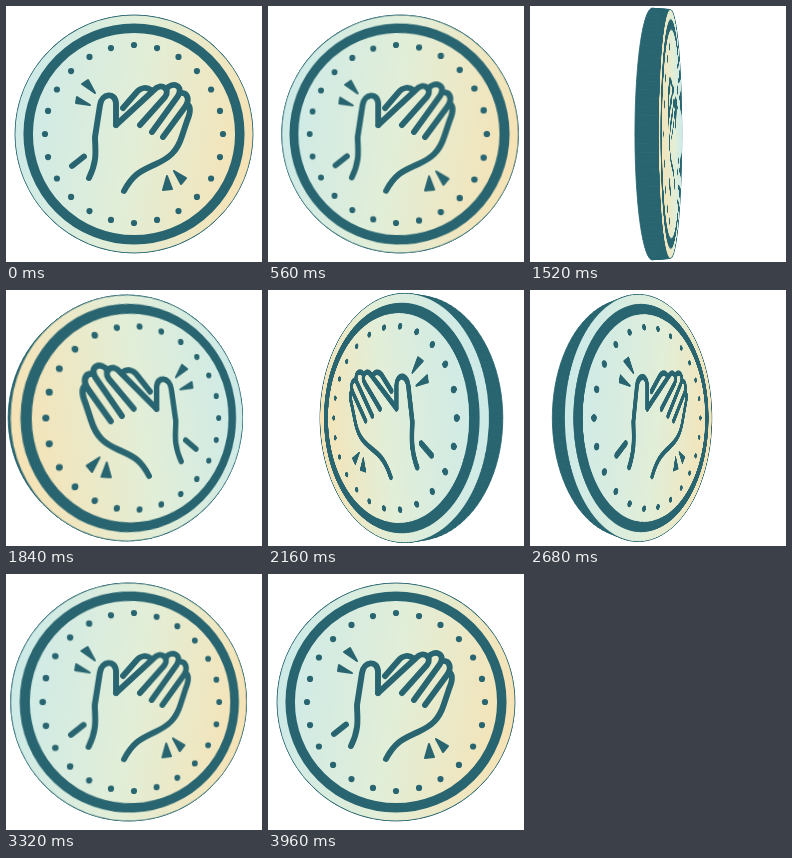
Animation of 256x256 px, one loop 4 s. Source, as an HTML page with a canvas:

```html
<!DOCTYPE html>
<html lang="en">
<head>
<meta charset="utf-8">
<title>Spinning coin</title>
<style>
  html, body { margin: 0; width: 100%; height: 100%; overflow: hidden; background: #fff; }
  #stage { position: relative; width: 100%; height: 100%; overflow: clip; contain: strict; }
  canvas, svg { position: absolute; left: 0; top: 0; width: 256px; height: 256px; }
</style>
</head>
<body>
<div id="stage">
<canvas id="side" width="256" height="256"></canvas>
<svg id="face" viewBox="0 0 256 256">
  <defs>
    <linearGradient id="sheen" x1="0" y1=".42" x2="1" y2=".58">
      <stop offset="0" stop-color="#cdeae8"/>
      <stop offset=".5" stop-color="#e2eed7"/>
      <stop offset="1" stop-color="#f6e2b4"/>
    </linearGradient>
  </defs>
  <circle cx="128" cy="128" r="118.6" fill="url(#sheen)"/>
  <g fill="none" stroke="#286570" stroke-width="5.9" stroke-linecap="round" stroke-linejoin="round">
    <circle cx="128" cy="128" r="105.8" stroke-width="9.5"/>
    <path d="M66 160L78 150.500"/>
    <path d="M83 172C92 154 89 143 89 131L94 99C96 87 109 86 110 97L110 119"/>
    <path d="M117 102L130 87C135 81 141 81 145 84"/>
    <path d="M110 119L148 84C155 76 165 83 159 91L134 119"/>
    <path d="M160 83C167 75 178 80 172 90L146 126"/>
    <path d="M174 87C182 86 184 94 179 101L157 131"/>
    <path d="M181 98C186 101 184 108 181 115L176 130C171 146 163 152 150 158C138 164 128 166 118 185"/>
  </g>
  <g fill="#286570" stroke="#286570" stroke-width="2" stroke-linejoin="round">
    <path d="M76 78L82 74L89 87ZM71 91L70 97L84 99Z"/>
    <path d="M161 170L157 184L166 183ZM168 165L180 172L175 178Z"/>
  </g>
  <g id="dots" fill="#286570"></g>
</svg>
</div>
<script>
const LOOP = 4000, RADIUS = 118.8, BACK_SCALE = 0.985, DEPTH = 16, EYE = 360, MID = 128, TEAL = '#286570';

// time in ms, turn in degrees
const turn = [
  [0, 0], [280, 1.2], [560, 6], [800, 17], [960, 28.5], [1120, 44], [1320, 69],
  [1520, 97.5], [1680, 126], [1920, 178], [2160, 227], [2240, 242], [2440, 274],
  [2680, 305], [2800, 316], [3000, 333], [3320, 352], [3640, 358.8], [3960, 360], [4000, 360]
];

const face = document.getElementById('face');
const ctx = document.getElementById('side').getContext('2d');

document.getElementById('dots').innerHTML = Array.from({ length: 24 }, (_, i) => {
  const a = i * Math.PI / 12;
  return `<circle cx="${MID + 89 * Math.cos(a)}" cy="${MID + 89 * Math.sin(a)}" r="3.1"/>`;
}).join('');

function slope(i) {
  if (i === 0 || i >= turn.length - 2) return 0;
  const [a, b] = [turn[i - 1], turn[i + 1]];
  return (b[1] - a[1]) / (b[0] - a[0]);
}

// smooth curve through the table
function angleAt(ms) {
  let i = 0;
  while (i < turn.length - 2 && ms >= turn[i + 1][0]) i++;
  const [t0, a0] = turn[i], [t1, a1] = turn[i + 1];
  const span = t1 - t0, u = (ms - t0) / span, v = 1 - u;
  return a0 * v * v * (1 + 2 * u) + a1 * u * u * (3 - 2 * u)
    + span * u * v * (slope(i) * v - slope(i + 1) * u);
}

function project(x, y, z, cos, sin) {
  const k = EYE / (EYE - (x * sin + z * cos));
  return [MID + (x * cos - z * sin) * k, MID + y * k];
}

function rim(radius, z, cos, sin) {
  return Array.from({ length: 121 }, (_, i) => {
    const a = i * Math.PI / 60;
    return project(radius * Math.cos(a), radius * Math.sin(a), z, cos, sin);
  });
}

function fillShape(points) {
  ctx.beginPath();
  for (const p of points) ctx.lineTo(...p);
  ctx.closePath();
  ctx.fill();
  ctx.stroke();
}

function draw(ms) {
  const deg = angleAt(ms), rad = deg * Math.PI / 180;
  const cos = Math.cos(rad), sin = Math.sin(rad);
  const front = rim(RADIUS, 0, cos, sin);
  const back = rim(RADIUS * BACK_SCALE, -DEPTH, cos, sin);

  ctx.clearRect(0, 0, 256, 256);
  ctx.fillStyle = ctx.strokeStyle = TEAL;
  ctx.lineWidth = 0.8;
  ctx.lineJoin = 'round';
  fillShape(cos > 0 ? front : back);
  for (let i = 0; i < 120; i++) {
    fillShape([front[i], front[i + 1], back[i + 1], back[i]]);
  }

  const showBack = -cos * EYE > DEPTH;
  const place = showBack ? `translateZ(${-DEPTH}px) scale(${BACK_SCALE})` : '';
  face.style.visibility = cos > 0 || showBack ? 'visible' : 'hidden';
  face.style.transform = `perspective(${EYE}px) rotateY(${-deg}deg) ${place}`;
}

const start = performance.now();
function tick() {
  const ms = (performance.now() - start) % LOOP;
  draw(Math.floor(ms / 40) * 40);
  requestAnimationFrame(tick);
}
tick();
</script>
</body>
</html>
```
